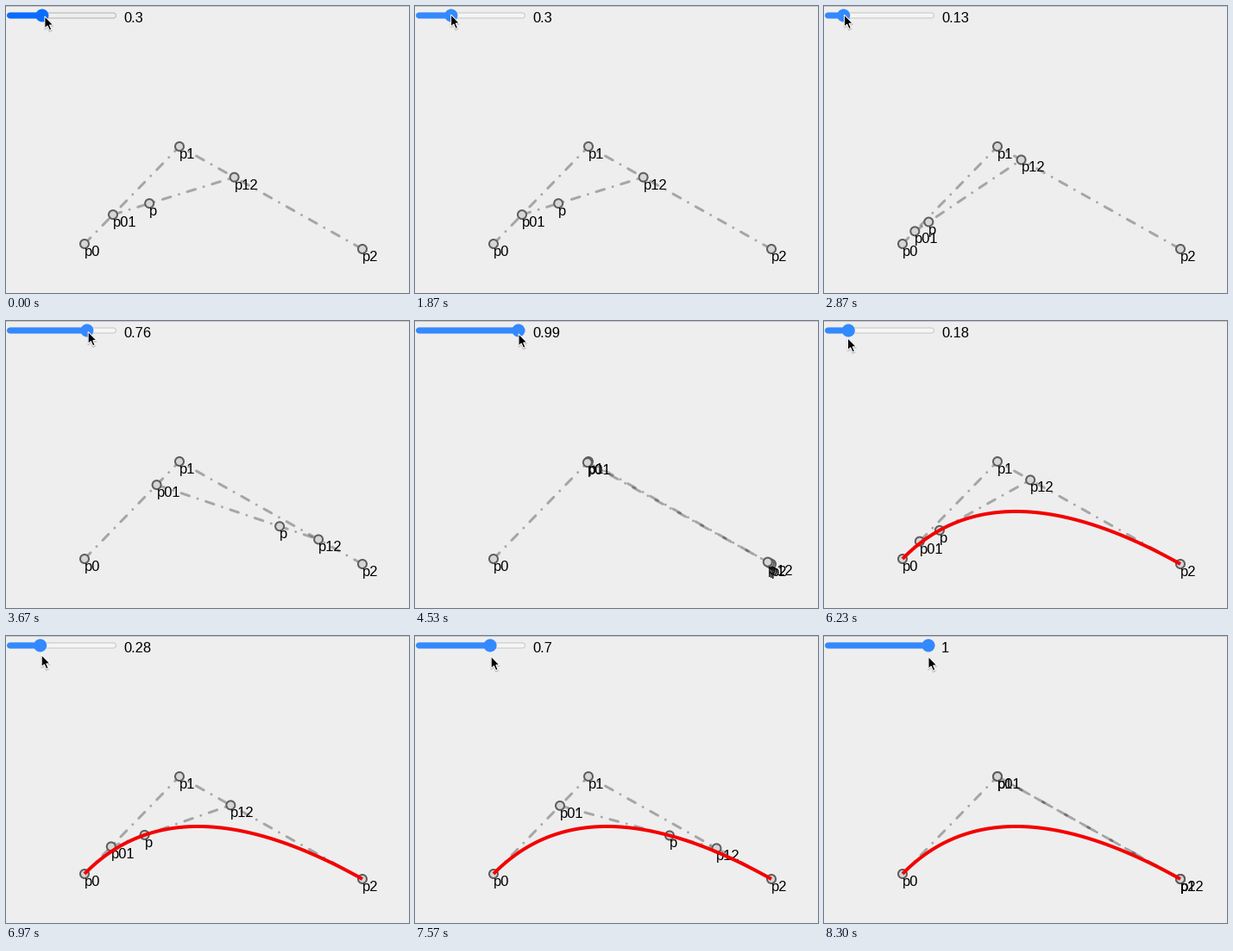
Animation, 467 px wide and 333 px high, one loop 8330 ms. Source, as a matplotlib script:

```python
import numpy as np
import matplotlib.pyplot as plt
from matplotlib.animation import FuncAnimation
from matplotlib.patches import Circle, Polygon, Rectangle

W, H, DPI = 467, 333, 64
PX = 72 / DPI  # points per pixel
FRAMES, STEP = 490, 17

P0, P1, P2 = np.array([[91, 276], [201, 163], [413, 282]], float)
PRESS_AT, CURVE_AT = 1400, 5270
POINTER_LEAD = 20  # ms the pointer runs ahead of the knob
IDLE = dict(bar="#0a6cff", border="#b2b2b2", track="#efefef")
ACTIVE = dict(bar="#3389ff", border="#c6c6c6", track="#f5f5f5")

# The drag back and forth: (time in ms, slider value)
DRAG = [(1850, .3), (2660, .09), (2865, .13), (3664, .76), (4190, 1), (4440, 1),
        (5330, .68), (6231, .18), (6540, .1), (7574, .7), (8280, 1)]
ARROW = np.array([(0, 0), (0, 14), (3.2, 11), (5.5, 16.3), (7.9, 15.3),
                  (5.6, 10.1), (9.8, 10)])


def drag_value(times):
    """Monotone cubic through the drag points, resting at both ends."""
    kt, kv = np.transpose(DRAG)
    rise = np.diff(kv) / np.diff(kt)
    a, b = rise[:-1], rise[1:]
    same = a * b > 0
    slope = np.zeros_like(kv)
    slope[1:-1][same] = 2 * a[same] * b[same] / (a[same] + b[same])

    now = np.clip(times, kt[0], kt[-1])
    i = np.clip(np.searchsorted(kt, now, side="right") - 1, 0, len(kt) - 2)
    h = kt[i + 1] - kt[i]
    u = (now - kt[i]) / h
    ease = u * u * (3 - 2 * u)
    return (kv[i] + (kv[i + 1] - kv[i]) * ease
            + h * u * (1 - u) * (slope[i] * (1 - u) - slope[i + 1] * u))


def ease(start, end, times):
    u = np.clip((times - start) / (end - start), 0, 1)
    return (1 - np.cos(np.pi * u)) / 2


def knob_x(value):
    return 8 + 113 * value


times = (np.arange(FRAMES) + .5) * STEP
values = np.round(drag_value(times), 2)

# Before the drag the pointer loops out and back in two moves, later it sinks.
loop = (ease(100, 400, times) + ease(570, 1000, times)) / 2
swing = np.sin(np.pi * loop)
sink = np.clip((times - 2800) / 4900, 0, 1)
pointer_x = knob_x(drag_value(times + POINTER_LEAD)) + 3 * (1 - loop) - 7 * swing
pointer_y = 12 - 2 * loop - 5.5 * swing + 14 * sink

plt.rcParams["lines.scale_dashes"] = False
plt.rcParams["font.family"] = "Liberation Sans"
fig = plt.figure(figsize=(W / DPI, H / DPI), dpi=DPI, facecolor="#eeeeee")
ax = fig.add_axes([0, 0, 1, 1])
ax.set(xlim=(0, W), ylim=(H, 0))
ax.axis("off")


def stroke(points, width, color, z, cap="round", **style):
    x, y = np.transpose(points)
    return ax.plot(x, y, lw=width * PX, color=color, zorder=z, snap=False,
                   solid_capstyle=cap, **style)[0]


def guide(points):
    dashes = [d * PX for d in (10, 10, .01, 10)]
    return stroke(points, 3, "black", 1, alpha=.3, dashes=dashes,
                  dash_capstyle="round", dash_joinstyle="round")


def write(x, y, text):
    return ax.text(x, y, text, fontsize=16.5 * PX, color="black", zorder=3,
                   va="baseline", ha="left")


class Anchor:
    def __init__(self, name, pos=(0, 0)):
        self.dot = ax.add_patch(Circle(pos, 5, fc="#d6d6d6", ec="#5e5e5e",
                                       lw=2 * PX, zorder=2))
        self.label = write(0, 0, name)
        self.move(pos)

    def move(self, pos):
        self.dot.center = pos
        self.label.set_position((pos[0], pos[1] + 14))


ax.add_patch(Rectangle((0, 0), W, 1, fc="#c6c6c6", lw=0))

rail = [(4.5, 11), (124.5, 11)]
border = stroke(rail, 7, IDLE["border"], 4)
track = stroke(rail, 5, IDLE["track"], 5)
bar = stroke(rail, 7, IDLE["bar"], 6)
knob = ax.add_patch(Circle((0, 11), 7.5, lw=0, zorder=7))
readout = write(136, 19, "")

guide([P0, P1, P2])
inner = guide([P0, P1])
for name, pos in (("p0", P0), ("p1", P1), ("p2", P2)):
    Anchor(name, pos)
a01, a12, a = Anchor("p01"), Anchor("p12"), Anchor("p")

s = np.linspace(0, 1, 80)[:, None]
curve = stroke((1 - s) ** 2 * P0 + 2 * s * (1 - s) * P1 + s * s * P2,
               4, "#f40000", 4, cap="butt")

shadow = ax.add_patch(Polygon(ARROW, fc="black", ec="black", lw=2 * PX,
                              alpha=.13, zorder=8))
arrow = ax.add_patch(Polygon(ARROW, fc="black", ec="white", lw=PX, zorder=9))


def draw(i):
    t = values[i]
    look = ACTIVE if times[i] >= PRESS_AT else IDLE
    x = knob_x(t)
    border.set_color(look["border"])
    track.set_color(look["track"])
    bar.set_color(look["bar"])
    bar.set_xdata([rail[0][0], x])
    knob.set_facecolor(look["bar"])
    knob.center = (x, 11)
    readout.set_text(f"{t:g}")

    p01 = P0 + (P1 - P0) * t
    p12 = P1 + (P2 - P1) * t
    a01.move(p01)
    a12.move(p12)
    a.move(p01 + (p12 - p01) * t)
    inner.set_data(*np.transpose([p01, p12]))
    curve.set_visible(times[i] >= CURVE_AT)

    tip = np.array([pointer_x[i], pointer_y[i]])
    arrow.set_xy(ARROW + tip)
    shadow.set_xy(ARROW + tip + (0, 1.2))
    return []


anim = FuncAnimation(fig, draw, frames=FRAMES, interval=STEP, repeat=True,
                     repeat_delay=0, init_func=lambda: draw(0))
plt.show()
```
